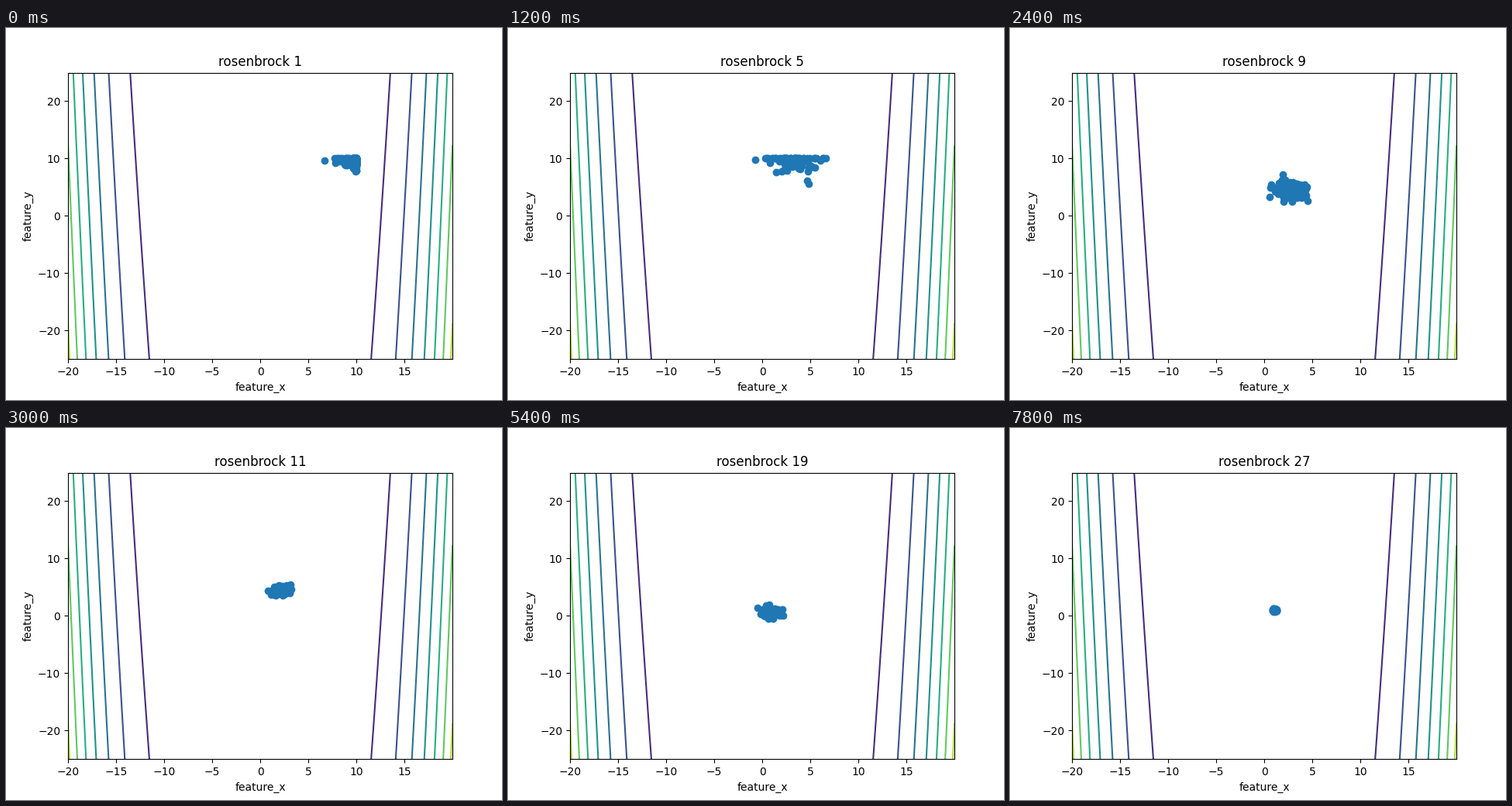
These frames come from a looping animation (640x480 px, 8000 ms). A matplotlib script:

```python
import matplotlib.pyplot as plt
import numpy as np
from matplotlib.animation import FuncAnimation

INTERVAL = 100
FRAMES = 80
FRAMES_PER_GENERATION = 3
POPULATION = 100
UPPER_BOUND = 10

# Course of the search: where the swarm is centred and how far it spreads
KEY_GENERATIONS = [1, 5, 7, 11, 15, 19, 27]
CENTRE_X = [9.9, 3.2, 2.9, 2.1, 1.7, 0.9, 1.05]
CENTRE_Y = [9.9, 10.1, 5.0, 4.4, 3.0, 0.65, 1.0]
SPREAD = [1.0, 1.45, 1.75, 0.45, 0.55, 0.5, 0.1]


def rosenbrock(x, y):
    return (1 - x) ** 2 + 100 * (y - x ** 2) ** 2


def at_generation(generation, values):
    return np.interp(generation, KEY_GENERATIONS, values)


def population(generation):
    """Normally distributed swarm with evenly ranked radii, cut at the bound."""
    rng = np.random.default_rng(generation)
    rank = (np.arange(POPULATION) + 0.5) / POPULATION
    angle = rng.uniform(0, 2 * np.pi, POPULATION)
    spread = np.exp(at_generation(generation, np.log(SPREAD)))
    radius = spread * np.sqrt(-2 * np.log(rank))
    x = at_generation(generation, CENTRE_X) + radius * np.cos(angle)
    y = at_generation(generation, CENTRE_Y) + radius * np.sin(angle)
    return np.minimum(np.column_stack([x, y]), UPPER_BOUND)


fig, ax = plt.subplots(figsize=(6.4, 4.8), dpi=100)
xs = np.linspace(-20, 19.99, 500)
ys = np.linspace(-25, 24.99, 500)
ax.contour(xs, ys, rosenbrock(*np.meshgrid(xs, ys)))
scatter = ax.scatter([], [], color="C0")
ax.set(xlim=(xs[0], xs[-1]), ylim=(ys[0], ys[-1]),
       xlabel="feature_x", ylabel="feature_y")
title = ax.set_title("")


def update(frame):
    generation = frame // FRAMES_PER_GENERATION + 1
    scatter.set_offsets(population(generation))
    title.set_text(f"rosenbrock {generation}")
    return scatter, title


anim = FuncAnimation(fig, update, frames=FRAMES, interval=INTERVAL,
                     repeat=True, repeat_delay=0)
plt.show()
```
